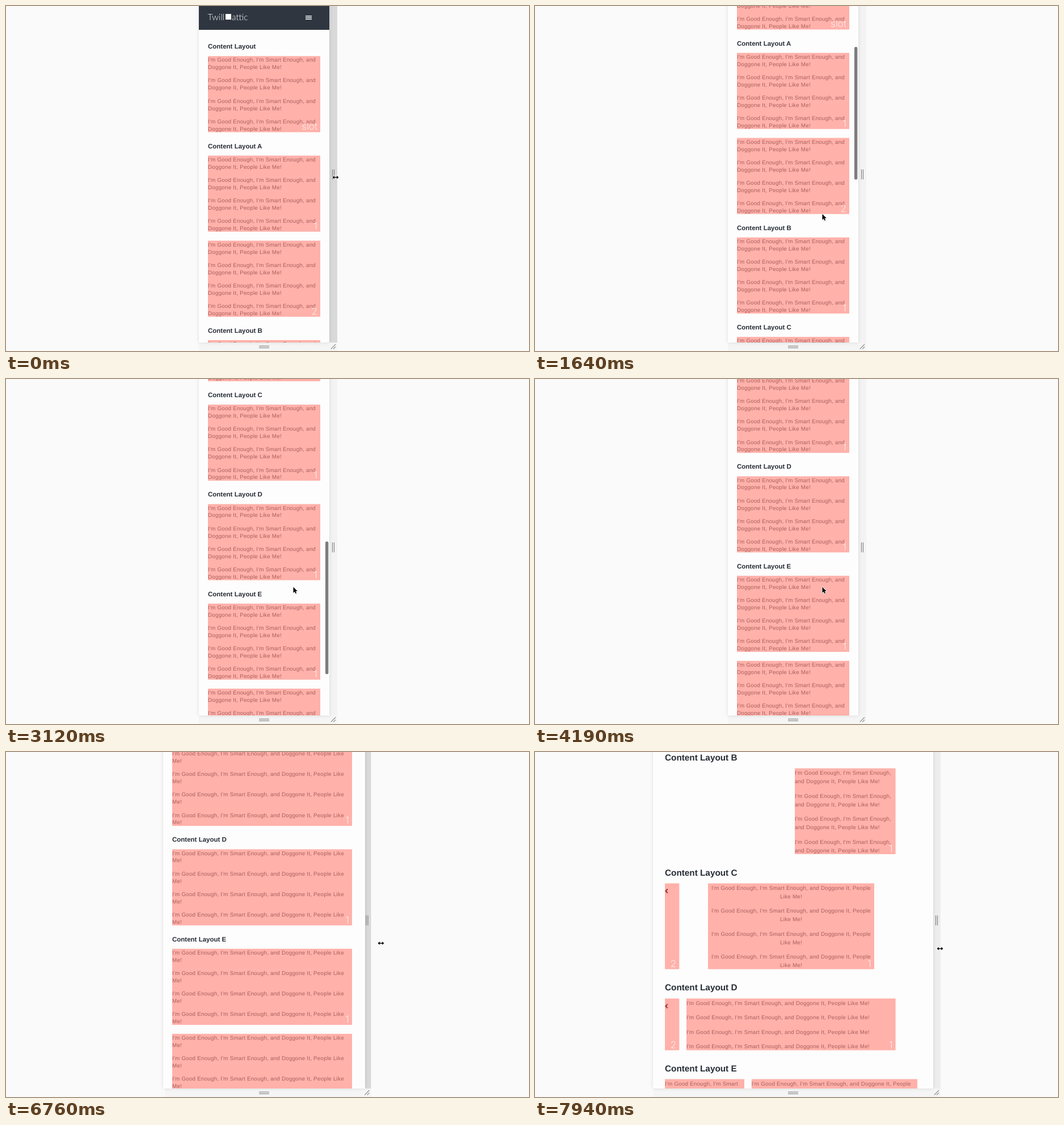
Recreate the animation shown at these times as an HTML page with a canvas. Size 922 by 608 pixels, loop 8 s.

```html
<!DOCTYPE html>
<html lang="en">
<head>
<meta charset="utf-8">
<title>Responsive layout preview</title>
<style>
html, body { margin: 0; width: 100%; height: 100%; overflow: hidden; background: #fafafa; }
canvas { display: block; }
</style>
</head>
<body>
<canvas id="stage" width="922" height="608"></canvas>
<script>
const ctx = document.getElementById('stage').getContext('2d');
ctx.textRendering = 'geometricPrecision';
const LOOP = 8000, MID = 462, FLOOR = 593, STRIP = 14, WIDE = 470;
const SANS = '"Liberation Sans", Arial, sans-serif';
const BODY = '9.8px ' + SANS;
const WORDS = "I'm Good Enough, I'm Smart Enough, and Doggone It, People Like Me!".split(' ');
const SMALL = { line: 12.92, gap: 10.25, base: 10.1 };
const LARGE = { line: 15, gap: 10.4, base: 11.5 };
const TOP = 88.3, BOX_GAP = 15.8, GROUP_GAP = 25.4;

// Number of changes done at time t, for n changes spread evenly from a to b.
function steps(t, a, b, n) {
  if (t < a) return 0;
  return Math.min(n, 1 + Math.floor((t - a) / (b - a) * (n - 1) + 0.1));
}

function along(keys, n) {
  for (let i = 1; i < keys.length; i++) {
    const [a, u] = keys[i - 1], [b, v] = keys[i];
    if (n <= b) return u + (v - u) * (n - a) / (b - a);
  }
  return keys[keys.length - 1][1];
}

const mix = (a, b, k) => a + (b - a) * k;
const grey = v => `rgb(${v},${v},${v})`;

function rect(x, y, w, h, fill) {
  ctx.fillStyle = fill;
  ctx.fillRect(x, y, w, h);
}

function text(str, x, y, font, fill, align = 'left', spacing = 0) {
  ctx.font = font;
  ctx.fillStyle = fill;
  ctx.textAlign = align;
  ctx.letterSpacing = spacing + 'px';
  ctx.fillText(str, x, y);
}

function line(points, color, width) {
  ctx.beginPath();
  points.forEach(([x, y]) => ctx.lineTo(x, y));
  ctx.strokeStyle = color;
  ctx.lineWidth = width;
  ctx.stroke();
}

function wrap(width) {
  ctx.font = BODY;
  ctx.letterSpacing = '0.23px';
  const out = [];
  let cur = '';
  for (const word of WORDS) {
    const next = cur ? cur + ' ' + word : word;
    if (cur && ctx.measureText(next).width > width) {
      out.push(cur);
      cur = word;
    } else cur = next;
  }
  return out.concat(cur);
}

const boxHeight = (rows, m) => 4 * rows * m.line + 3 * m.gap;

function label(str, right, bottom) {
  text(str, right - 5, bottom - 4, '300 17px Inter, sans-serif', 'rgba(255,255,255,.75)', 'right');
}

function box(x, y, w, tag, m, centered) {
  const rows = wrap(w);
  const h = boxHeight(rows.length, m);
  rect(x, y, w, h, '#ffb1aa');
  for (let p = 0; p < 4; p++) {
    rows.forEach((row, i) => {
      const by = y + m.base + p * (rows.length * m.line + m.gap) + i * m.line;
      text(row, centered ? x + w / 2 : x, by, BODY, '#ab5f5c', centered ? 'center' : 'left', 0.23);
    });
  }
  label(tag, x + w, y + h);
  return h;
}

function heading(str, x, y, size) {
  text('Content Layout' + str, x, y, `bold ${size}px ${SANS}`, '#272d36');
}

function header(x, w, y) {
  rect(x, y, w, 42, '#2f3640');
  const font = '300 15.5px Lato, sans-serif';
  text('Twill', x + 15.5, y + 24.5, font, '#fff');
  rect(x + 47, y + 14, 10, 10, '#fff');
  text('attic', x + 58, y + 24.5, font, '#fff');
  for (let i = 0; i < 3; i++) rect(x + w - 42, y + 17 + i * 2.8, 11, 1.4, '#fff');
}

function narrowPage(x, w, scroll) {
  const inner = w - 32, left = x + 16;
  const h = boxHeight(wrap(inner).length, SMALL);
  const end = TOP + 8 * h + 7 * BOX_GAP + 5 * GROUP_GAP;
  let y = TOP - Math.min(scroll, end + 90 - FLOOR);
  header(x, w, y - TOP);
  const groups = [['', 'slot'], [' A', '1', '2'], [' B', '1'], [' C', '1'], [' D', '1'], [' E', '1', '2']];
  for (const [name, ...tags] of groups) {
    heading(name, left, y - 13, 11.5);
    for (const tag of tags) {
      box(left, y, inner, tag, SMALL);
      y += h + BOX_GAP;
    }
    y += GROUP_GAP;
  }
}

function sideBox(x, y, h) {
  rect(x, y, 25.3, h, '#ffb1aa');
  line([[x + 4.7, y + 10], [x + 1.4, y + 13.5], [x + 4.7, y + 17]], '#98303a', 1.9);
  label('2', x + 25.3, y + h);
}

function widePage(x) {
  const left = x + 21;
  heading(' B', left, 15.2, 15.3);
  box(left + 229, 28.8, 177.6, '1', LARGE);
  heading(' C', left, 217.5, 15.3);
  const c = box(left + 76, 231.5, 293, '1', LARGE, true);
  sideBox(left, 231.5, c);
  heading(' D', left, 420, 15.3);
  const d = box(left + 38, 434.4, 368.6, '1', LARGE);
  sideBox(left, 434.4, d);
  heading(' E', left, 563, 15.3);
  box(left, 576.5, 140, '2', LARGE);
  box(left + 152.8, 576.5, 292.2, '1', LARGE);
}

function shape(points, x, y) {
  ctx.beginPath();
  points.forEach(([px, py]) => ctx.lineTo(x + px, y + py));
  ctx.closePath();
  ctx.lineJoin = 'round';
  ctx.strokeStyle = '#fff';
  ctx.lineWidth = 1.6;
  ctx.stroke();
  ctx.fillStyle = '#000';
  ctx.fill();
  ctx.lineJoin = 'miter';
}

function pointer({ x, y, drag }) {
  if (drag) {
    const half = [[-5.4, 0], [-2.2, -3], [-2.2, -0.8], [2.2, -0.8], [2.2, -3]];
    shape([...half, ...half.map(([a, b]) => [-a, -b])], x, y);
  } else {
    shape([[0, 0], [0, 10.4], [2.4, 8.2], [4.1, 11.8], [5.7, 11.1], [4.1, 7.5], [7.3, 7.5]], x, y);
  }
}

// Pointer place and how dark the side handle is.
function pointerAt(t, k1, k2) {
  if (t < 590) return { x: 581, y: 302, drag: true, hover: 1 };
  if (t < 5030) {
    return steps(t, 590, 830, 2) < 2
      ? { x: 540, y: 344, hover: 0.5 }
      : { x: 506.5, y: 366.5, hover: 0 };
  }
  const n = steps(t, 5030, 5420, 4);
  if (n < 3) return { x: mix(506.5, 570, n / 3), y: mix(366.5, 338, n / 3), hover: 0 };
  if (t < 5900) return { x: n < 4 ? 576 : 580.5, y: 335, drag: true, hover: n < 4 ? 0.5 : 1 };
  return {
    x: mix(mix(595, 661, (k1 - 1) / 4), 714, k2 / 5),
    y: 335 + (k1 - 1) / 2 + k2 * 1.9,
    drag: true,
    hover: k2 === 5 ? 0.25 : 1
  };
}

function grips(right) {
  const ink = '#858585', mid = right - STRIP / 2;
  for (const d of [-1.5, 1.5]) {
    line([[mid + d, 288], [mid + d, 305.5]], ink, 1.2);
    line([[446, 600.8 + d], [464, 600.8 + d]], ink, 1.2);
  }
  line([[mid - 4.2, 604.4], [mid + 4, 596.2]], ink, 1.2);
  line([[mid + 0.2, 604.4], [mid + 4, 600.6]], ink, 1.2);
}

function draw(t) {
  const rolled = steps(t, 1220, 2220, 8) + steps(t, 2370, 3410, 8);
  const scroll = along([[0, 0], [4, 181], [8, 420], [14, 719], [16, 768]], rolled);
  const k1 = steps(t, 5900, 6760, 5), k2 = steps(t, 7020, 7940, 5);
  const pos = pointerAt(t, k1, k2);

  let right = 584, lead = 0;
  if (k1) {
    const k = (k1 - 1) / 4;
    right = mix(mix(584, 643.5, Math.pow(k, 1.3)), 715, k2 / 5);
    lead = mix(mix(1, 3.5, k), 1, k2 / 5);
  }
  const left = 2 * MID - right;
  const width = right - STRIP - left;
  const px = left - lead, pw = width + 2 * lead;

  rect(0, 0, 922, 608, '#fafafa');
  rect(left, FLOOR, right - left, 15, '#f5f5f5');
  rect(right - STRIP, 0, STRIP, FLOOR, grey(Math.round(mix(243, 217, pos.hover))));

  ctx.save();
  ctx.shadowColor = 'rgba(0,0,0,.12)';
  ctx.shadowBlur = 6;
  rect(px, -10, pw, FLOOR + 10, '#fdfdfd');
  ctx.restore();

  ctx.save();
  ctx.beginPath();
  ctx.rect(px, 0, pw, FLOOR);
  ctx.clip();
  if (width >= WIDE) widePage(px);
  else narrowPage(px, width, scroll);

  const fade = rolled ? 1 - steps(t, 4040, 4190, 2) / 2 : 0;
  if (fade > 0) {
    ctx.globalAlpha = fade;
    ctx.fillStyle = '#7d7d7d';
    ctx.beginPath();
    ctx.roundRect(563, scroll * 0.398, 5.4, 234, 2.7);
    ctx.fill();
  }
  ctx.restore();

  grips(right);
  pointer(pos);
}

function tick(now) {
  draw(now % LOOP);
  requestAnimationFrame(tick);
}
draw(0);
requestAnimationFrame(tick);
</script>
</body>
</html>
```
